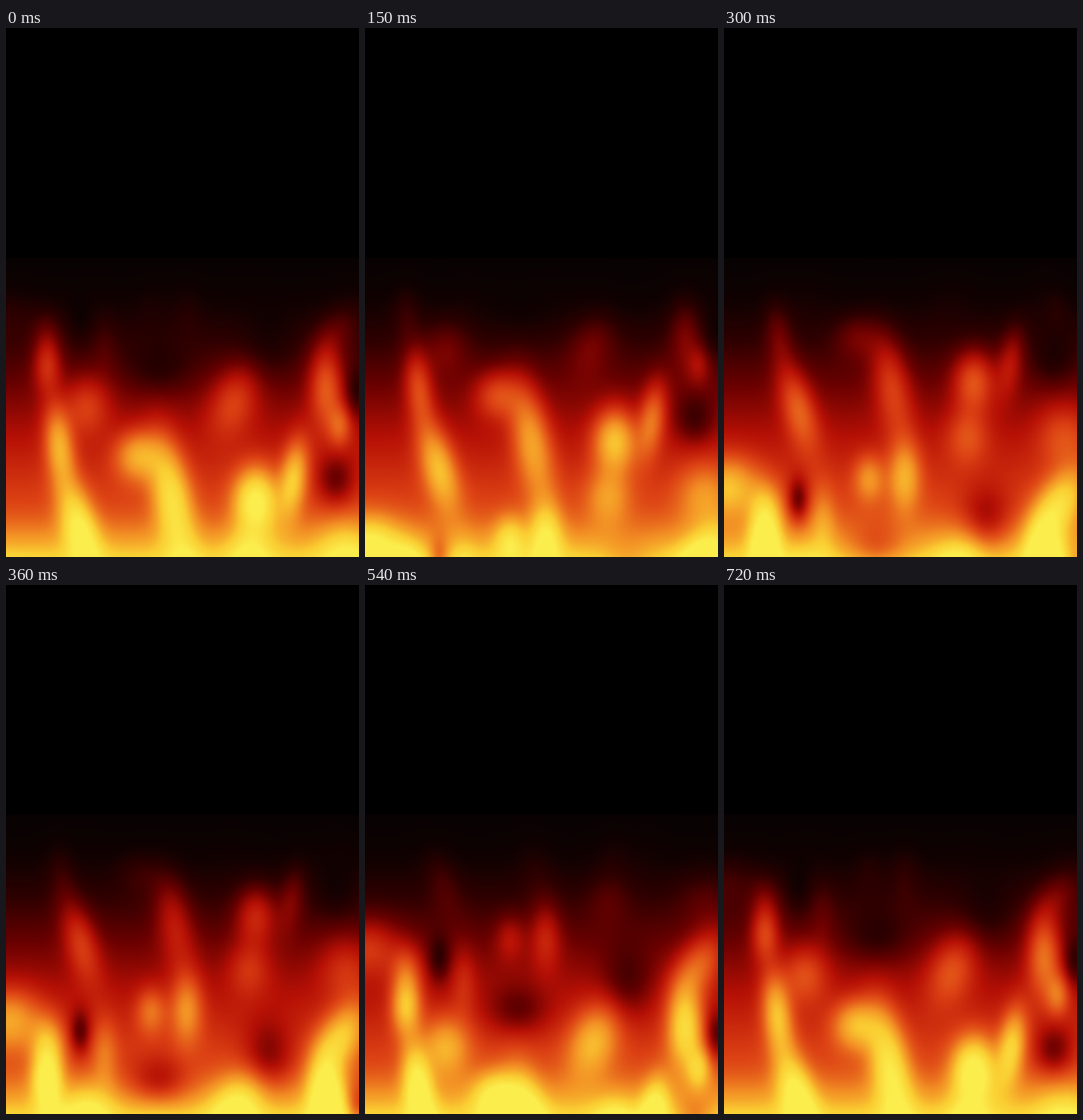
These frames come from a looping animation (428 px wide and 642 px high, 0.75 s). An HTML page with a canvas:

```html
<!DOCTYPE html>
<html lang="en">
<head>
<meta charset="utf-8">
<title>Fire</title>
<style>
  html, body { margin: 0; width: 100%; height: 100%; overflow: hidden; background: #000; }
  canvas { display: block; }
</style>
</head>
<body>
<canvas id="stage" width="428" height="642"></canvas>
<script>
const WIDTH = 428, HEIGHT = 642, TOP = 279;
const CELL_W = 4, CELL_H = 3, COLS = WIDTH / CELL_W, ROWS = HEIGHT / CELL_H;
const PERIOD = 375, STEP_MS = 30, STEPS = 25;
const TEX_ROWS = PERIOD / CELL_H, ROWS_PER_STEP = TEX_ROWS / STEPS;
const BASE_HEAT = 0.42;

// x, y, radius x, radius y, heat, lean
const TONGUES = [
  [50, 778, 17, 34, .52],
  [64, 500, 17, 48, .48, .1],
  [88, 602, 21, 52, .43, .22],
  [98, 828, 28, 36, .3],
  [120, 745, 15, 42, .14],
  [5, 705, 36, 36, .36],
  [50, 735, 19, 32, .3],
  [160, 517, 27, 30, .4],
  [200, 562, 23, 68, .47, .15],
  [219, 690, 19, 42, .34],
  [176, 695, 18, 28, .25],
  [185, 785, 38, 32, -.18],
  [90, 722, 13, 28, -.22],
  [278, 820, 29, 44, .34, -.2],
  [303, 572, 25, 38, .58],
  [295, 642, 26, 34, .22],
  [349, 543, 16, 46, .42, -.12],
  [400, 548, 24, 32, -.2],
  [412, 640, 32, 40, .22],
  [408, 725, 27, 42, .42, -.35],
  [388, 800, 20, 50, .56],
  [405, 856, 14, 25, .28],
  [426, 815, 14, 30, -.22],
  [318, 750, 31, 46, -.18]
];

// heat, red, green, blue
const PALETTE = [
  [0, 8, 2, 2],
  [.05, 18, 1, 1],
  [.12, 48, 0, 0],
  [.2, 105, 0, 0],
  [.3, 182, 16, 5],
  [.42, 220, 66, 20],
  [.58, 242, 142, 36],
  [.75, 250, 205, 50],
  [.95, 251, 237, 76]
];

const clamp = v => Math.min(1, Math.max(0, v));

function heatAt(x, y) {
  let heat = BASE_HEAT;
  for (const [cx, cy, rx, ry, amount, lean = 0] of TONGUES) {
    const dy = (y - cy + PERIOD * 2.5) % PERIOD - PERIOD / 2;
    const dx = x - cx - lean * dy;
    heat += amount * Math.exp(-((dx / rx) ** 2) - (dy / ry) ** 2);
  }
  return Math.max(.2, heat);
}

const texture = Float32Array.from({ length: COLS * TEX_ROWS }, (_, i) =>
  heatAt((i % COLS + .5) * CELL_W, (Math.floor(i / COLS) + .5) * CELL_H));

// Flames cool as they rise; the bottom edge glows a little more.
const cooling = Array.from({ length: ROWS }, (_, row) => {
  const y = (row + .5) * CELL_H, soft = .05;
  const glow = clamp((y - 570) / 72);
  return {
    gain: soft * Math.log(1 + Math.exp((y - 305) / 270 / soft)),
    lift: .26 * glow * glow
  };
});

const colours = Array.from({ length: 1001 }, (_, n) => {
  const heat = n / 1000;
  const i = PALETTE.findIndex(stop => stop[0] > heat);
  if (i < 0) return PALETTE[PALETTE.length - 1].slice(1);
  const a = PALETTE[i - 1], b = PALETTE[i];
  const k = (heat - a[0]) / (b[0] - a[0]);
  return [1, 2, 3].map(c => a[c] + (b[c] - a[c]) * k);
});

const ctx = document.getElementById("stage").getContext("2d");
const small = document.createElement("canvas");
small.width = COLS;
small.height = ROWS;
const smallCtx = small.getContext("2d");
const pixels = smallCtx.createImageData(COLS, ROWS);

function draw(step) {
  for (let row = 0; row < ROWS; row++) {
    const lit = row * CELL_H >= TOP;
    const { gain, lift } = cooling[row];
    const source = (row + step * ROWS_PER_STEP) % TEX_ROWS * COLS;
    for (let col = 0; col < COLS; col++) {
      const p = (row * COLS + col) * 4;
      pixels.data[p + 3] = 255;
      if (!lit) continue;
      const heat = clamp(texture[source + col] * gain + lift);
      const [r, g, b] = colours[Math.round(heat * 1000)];
      pixels.data[p] = r;
      pixels.data[p + 1] = g;
      pixels.data[p + 2] = b;
    }
  }
  smallCtx.putImageData(pixels, 0, 0);
  ctx.imageSmoothingEnabled = true;
  ctx.imageSmoothingQuality = "high";
  ctx.drawImage(small, 0, 0, WIDTH, HEIGHT);
}

const start = performance.now();
function tick() {
  const elapsed = Math.max(0, performance.now() - start);
  draw(Math.floor(elapsed / STEP_MS) % STEPS);
  requestAnimationFrame(tick);
}
tick();
</script>
</body>
</html>
```
